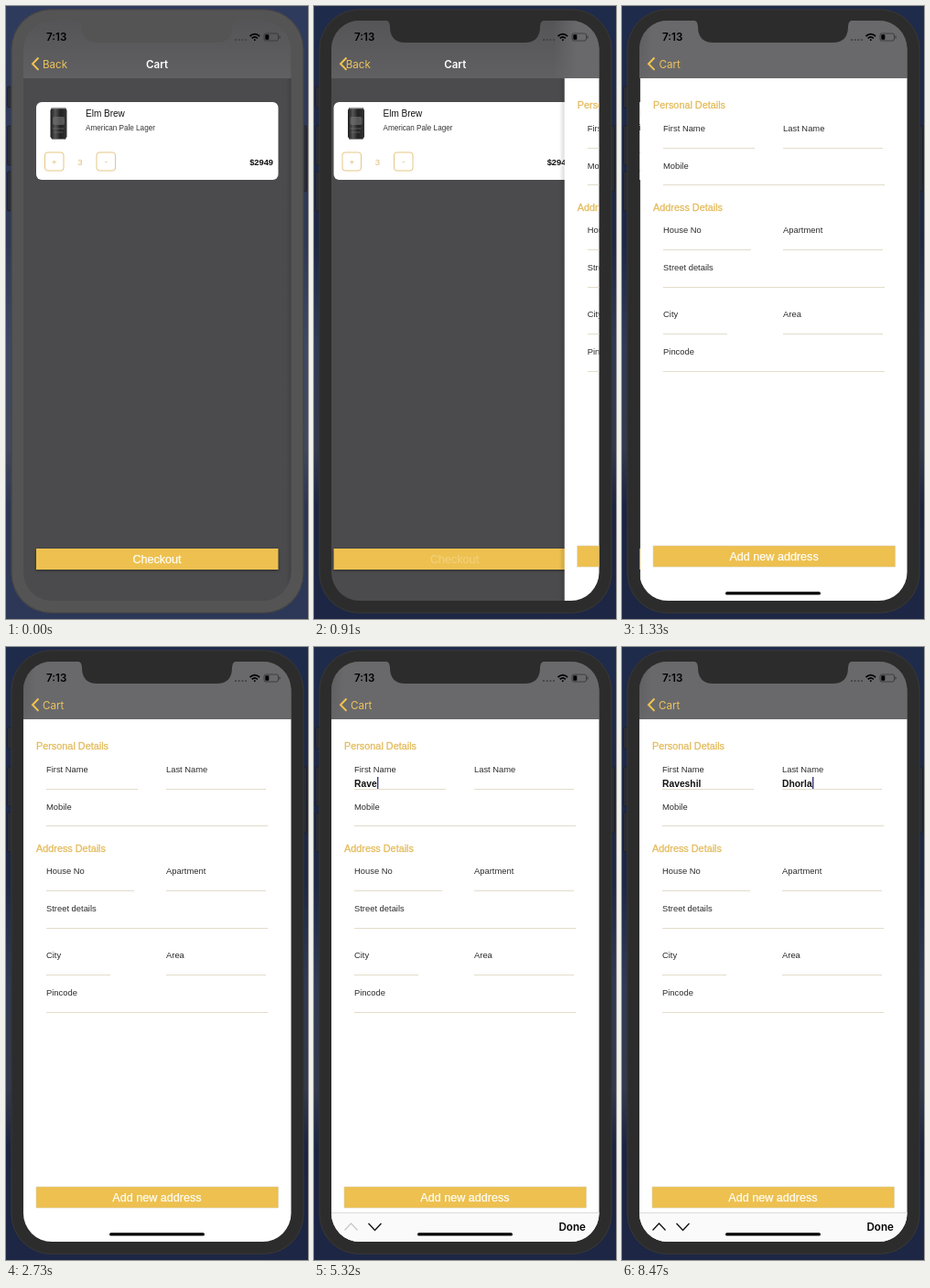
An HTML page that plays this animation: 330 by 670 pixels, repeating every 8540 ms.

```html
<!DOCTYPE html>
<html lang="en">
<head>
<meta charset="utf-8">
<title>Cart checkout</title>
<style>
html, body { margin: 0; width: 100%; height: 100%; overflow: hidden; background: #1d2846; }
svg { display: block; width: 330px; height: 670px; }
text { font-family: "Liberation Sans", Arial, sans-serif; white-space: pre; }
.ui { font-family: Inter, "Liberation Sans", sans-serif; font-size: 11.6px; }
.semi { font-weight: 600; }
.label { font-size: 9.4px; fill: #2c2c2c; }
.head { font-size: 10.85px; fill: #e3bb5c; stroke: #e3bb5c; stroke-width: .3; }
.btn { font-size: 12.6px; fill: #fffdf5; stroke: #fffdf5; stroke-width: .25; text-anchor: middle; }
.input { font-size: 10.3px; font-weight: bold; fill: #111; }
.gold { fill: #eec35c; }
</style>
</head>
<body>
<svg viewBox="0 0 330 670" xmlns="http://www.w3.org/2000/svg">
  <defs>
    <linearGradient id="sky" x1="0" y1="0" x2="0" y2="1">
      <stop offset="0" stop-color="#1f2b4b"/>
      <stop offset=".38" stop-color="#1e2843"/>
      <stop offset=".55" stop-color="#303a55"/>
      <stop offset=".72" stop-color="#343a4c"/>
      <stop offset=".82" stop-color="#1b2440"/>
      <stop offset="1" stop-color="#1d2745"/>
    </linearGradient>
    <linearGradient id="navDark" x1="0" y1="0" x2="0" y2="1">
      <stop offset="0" stop-color="#555557"/>
      <stop offset="1" stop-color="#606062"/>
    </linearGradient>
    <linearGradient id="navEdge">
      <stop offset="0" stop-color="#69696b" stop-opacity="0"/>
      <stop offset=".08" stop-color="#69696b"/>
    </linearGradient>
    <linearGradient id="shade">
      <stop offset="0" stop-opacity="0"/>
      <stop offset="1" stop-opacity=".14"/>
    </linearGradient>
    <linearGradient id="can">
      <stop offset="0" stop-color="#1b1b1b"/>
      <stop offset=".3" stop-color="#555"/>
      <stop offset=".6" stop-color="#222"/>
      <stop offset="1" stop-color="#333"/>
    </linearGradient>
    <clipPath id="screen"><rect x="19" y="16" width="292.500" height="634" rx="31"/></clipPath>
  </defs>

  <rect width="330" height="670" fill="url(#sky)"/>
  <rect id="wash" width="330" height="670" fill="#8490b8"/>
  <g fill="#2b2d35" stroke="#1a1d28" stroke-width=".7">
    <rect x="1.500" y="88" width="6" height="23" rx="1.500"/>
    <rect x="1.500" y="131" width="6" height="43" rx="1.500"/>
    <rect x="1.500" y="181" width="6" height="43" rx="1.500"/>
    <rect x="322.500" y="131" width="6" height="72" rx="1.500"/>
  </g>
  <rect class="bezel" x="5.500" y="3.300" width="320" height="660.500" rx="44"/>

  <g clip-path="url(#screen)">
    <rect x="19" y="16" width="293" height="634" fill="#4b4b4d"/>
    <g id="cart">
      <rect x="33" y="105" width="264.500" height="85" rx="6" fill="#fff"/>
      <path d="M50 111h15l1.500 3v29l-2 3h-14l-2-3v-29z" fill="url(#can)"/>
      <path d="M50 111.500h15" stroke="#aaa" stroke-width="1.500"/>
      <path d="M50 145.500h14.500" stroke="#888"/>
      <rect x="51" y="121" width="13" height="9" rx="2" fill="#777" opacity=".6"/>
      <path d="M51 134h12M52 138h10" stroke="#777" opacity=".6"/>
      <text x="87" y="120.500" font-size="10" fill="#111">Elm Brew</text>
      <text x="87" y="136" font-size="8.150" fill="#333">American Pale Lager</text>
      <g fill="none" stroke="#e2c078" stroke-width=".9">
        <rect x="42.500" y="160" width="20.500" height="20" rx="3"/>
        <rect x="99" y="160" width="20.500" height="20" rx="3"/>
      </g>
      <g fill="#dfbd74" font-size="9.500" text-anchor="middle">
        <text x="52.700" y="173.500">+</text>
        <text x="81" y="173.500">3</text>
        <text x="109.300" y="173">-</text>
      </g>
      <text x="292" y="173.500" font-size="9.300" font-weight="bold" text-anchor="end" fill="#111">$2949</text>
      <rect x="33" y="593" width="264.500" height="23" fill="#edc04f" style="filter:drop-shadow(0 1px 1.500px #0007)"/>
      <text id="checkout" class="btn" x="165" y="609.200">Checkout</text>
    </g>
    <rect id="dim" x="19" y="79" width="293" height="571"/>

    <g id="form">
      <rect x="13" y="79" width="6" height="571" fill="url(#shade)"/>
      <rect x="19" y="79" width="293" height="571" fill="#fff"/>
      <g id="fields"></g>
      <rect x="33" y="590" width="264.500" height="23" fill="#edc04f" stroke="#d9cfb0" stroke-width=".6"/>
      <text class="btn" x="165" y="606.400">Add new address</text>
      <text id="first" class="input" x="44" y="152.500"></text>
      <text id="last" class="input" x="175" y="152.500"></text>
      <rect id="caret" y="142" width="1.500" height="13" fill="#3d4080"/>
    </g>

    <g id="bar">
      <rect x="19" y="618" width="293" height="34" fill="#fafafb"/>
      <path d="M19 618.500h293" stroke="#d4d4d6" stroke-width=".8"/>
      <g fill="none" stroke-width="1.300">
        <path id="up" d="M33.500 637.500l7-7.500 7 7.500"/>
        <path d="M59.500 630l7 7.500 7-7.500" stroke="#111"/>
      </g>
      <text class="ui semi" x="267.500" y="638.300">Done</text>
    </g>
    <rect id="home" x="113" y="640.300" width="104" height="3.200" rx="1.600"/>

    <rect x="19" y="16" width="293" height="63" fill="url(#navDark)"/>
    <rect id="navLight" y="16" width="320" height="63" fill="url(#navEdge)"/>
    <path d="M35.500 56.500l-6.500 6.700 6.500 6.700" fill="none" stroke="#f0c24f" stroke-width="2"/>
    <text id="back" class="ui gold" y="67.800">Back</text>
    <text id="title" class="ui semi" y="67.800" fill="#fff">Cart</text>
    <text id="backCart" class="ui gold" y="67.800">Cart</text>

    <text class="ui semi" x="44" y="38.300">7:13</text>
    <path d="M250 37h13" stroke="#3d3d3f" stroke-width="1.700" stroke-dasharray="2 1.700"/>
    <g fill="none" stroke="#000" stroke-width="1.700">
      <path d="M266.500 33q5.300-4.800 10.600 0M268.700 35.300q3.100-2.700 6.200 0"/>
      <path d="M271 37.200h1.600"/>
    </g>
    <rect x="282" y="30" width="15.500" height="8" rx="2" fill="none" stroke="#333" stroke-width=".8"/>
    <path d="M299 32.500v3" stroke="#333"/>
    <rect x="283.300" y="31.300" width="4" height="5.400" rx=".8"/>
  </g>
  <path class="bezel" d="M77 15.500q6 0 6 7q0 17.500 17 17.500h130q17 0 17-17.500q0-7 6-7z"/>
  <rect x="6" y="3.800" width="319" height="659.500" rx="43.500" fill="none" stroke="#3b3b3d" stroke-width=".8"/>
</svg>
<script>
const LOOP = 8540, TICK = 70, WIDTH = 293;
const $ = id => document.getElementById(id);
const set = (id, attrs) => { for (const k in attrs) $(id).setAttribute(k, attrs[k]); };
const ramp = (t, a, b) => Math.min(1, Math.max(0, (t - a) / (b - a)));
const slide = (id, x, y = 0) => set(id, { transform: `translate(${x} ${y})` });

// label, x, baseline, underline end, underline y
const FIELDS = [
  ["First Name", 44, 136.5, 144, 155.5], ["Last Name", 175, 136.5, 284, 155.5],
  ["Mobile", 44, 177.5, 286, 195.5],
  ["House No", 44, 248, 140, 266.5], ["Apartment", 175, 248, 284, 266.5],
  ["Street details", 44, 289, 286, 307.5],
  ["City", 44, 340, 114, 358.5], ["Area", 175, 340, 284, 358.5],
  ["Pincode", 44, 381, 286, 399.5]
];
$("fields").innerHTML =
  `<text class="head" x="33" y="112">Personal Details</text>
   <text class="head" x="33" y="223.500">Address Details</text>` +
  FIELDS.map(([name, x, y, end, line]) =>
    `<text class="label" x="${x}" y="${y}">${name}</text>
     <path d="M${x} ${line}H${end}" stroke="#e3dccb"/>`).join("");

const FOCUS = 3150, NEXT = 6650;
const ENTRIES = [
  { id: "first", x: 44, from: FOCUS, word: "Raveshil", keys: [5040, 5110, 5250, 5320, 5460, 5530, 5670, 5740] },
  { id: "last", x: 175, from: NEXT, word: "Dhorla", keys: [7560, 7700, 7840, 7910, 8050, 8190] }
];

// Critically damped push transition
function push(t) {
  const x = Math.max(0, t - 873.4) * 0.0171;
  return 1 - (1 + x) * Math.exp(-x);
}

function blink(age) {
  const s = age % 1000;
  return s < 800 ? 1 - ramp(s, 500, 700) : ramp(s, 800, 1000);
}

function drawEntries(t) {
  for (const e of ENTRIES) {
    const count = e.keys.filter(k => k <= t).length;
    const el = $(e.id);
    el.textContent = e.word.slice(0, count);
    if (t >= e.from) {
      const since = count ? e.keys[count - 1] : e.from;
      const w = count ? el.getComputedTextLength() : 0;
      set("caret", { x: e.x + w + 0.3, opacity: blink(t - since) });
    }
  }
  if (t < FOCUS) set("caret", { opacity: 0 });
}

function draw(t) {
  const fade = 1 - ramp(t, 0, 560);
  const grey = Math.round(44 + 40 * fade);
  document.querySelectorAll(".bezel").forEach(b => b.setAttribute("fill", `rgb(${grey},${grey},${grey})`));
  set("wash", { opacity: fade * 0.16 });

  const p = push(t), q = p ** 1.15, rest = WIDTH * (1 - p);
  slide("cart", -0.3 * WIDTH * p);
  slide("form", rest);
  set("dim", { opacity: 0.08 * p * p });
  set("navLight", { x: 19 + rest - 12 * Math.min(1, p * 8), opacity: p > 0 ? 1 : 0 });
  set("back", { x: 40 - 40 * p, opacity: 1 - ramp(p, 0.13, 0.6) });
  const left = 153 - 113 * q;
  set("title", { x: left, opacity: 1 - ramp(p, 0.2, 0.95) });
  set("backCart", { x: left, opacity: ramp(p, 0.2, 0.95) });
  set("checkout", { opacity: 1 - 0.75 * (ramp(t, 700, 840) - ramp(t, 910, 1190)) });
  set("home", { opacity: ramp(p, 0.2, 0.7) });

  const rise = 1 - (1 - ramp(t, 3080, 3430)) ** 3;
  slide("bar", 0, 34 * (1 - rise));
  set("up", { stroke: t < NEXT ? "#c9c9cc" : "#111" });
  drawEntries(t);
}

const start = performance.now();
function frame() {
  const t = (performance.now() - start) % LOOP;
  draw(Math.floor(t / TICK) * TICK);
  requestAnimationFrame(frame);
}
frame();
</script>
</body>
</html>
```
